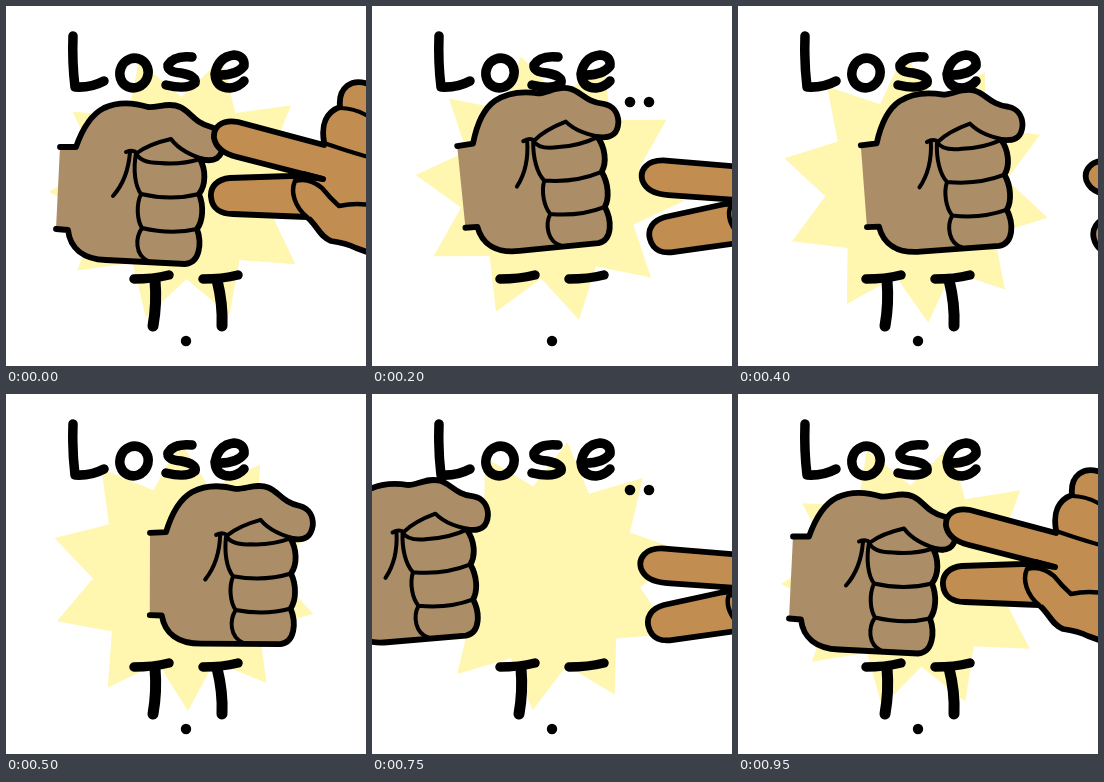
Write an HTML page that moves like this. It is 360 px wide and 360 px high and loops after 1 s.

```html
<!DOCTYPE html>
<html lang="en">
<head>
<meta charset="utf-8">
<title>Lose</title>
<style>
  html, body { margin: 0; width: 100%; height: 100%; overflow: hidden; background: #fff; }
  svg { display: block; width: 100vw; height: 100vh; }
  path { stroke-linecap: round; stroke-linejoin: round; }
  .line { stroke: #000; stroke-width: 5.8; }
  .thin { fill: none; stroke: #000; stroke-width: 4; }
  .ink { fill: none; stroke: #000; stroke-width: 9.5; }
  #fist { fill: #ab8d67; }
  #hand { fill: #c18d51; }
</style>
</head>
<body>
<svg viewBox="0 0 360 360" role="img" aria-label="Lose... T.T">
  <polygon id="star" fill="#fff6af"/>

  <g id="fist">
    <path class="line" d="M54 141 L70 141 C76 124 84 109 98 102 C111 96 126 96 142 101
      C151 102 163 96 174 101 C184 105 188 117 205 121 C214 124 218 132 217 141
      C215 151 210 157 194 153 C200 164 200 179 193 188 C198 200 197 215 191 223
      C196 237 194 257 179 258 L100 254 C77 253 64 242 62 224 L50 223"/>
    <path class="thin" d="M120 146 Q127 143 131 147 Q143 138 165 133 Q176 148 204 155
      M124 146 Q122 173 107 190
      M130 147 Q134 157 154 157 Q175 159 194 153
      M130 147 C127 164 129 180 135 188 Q165 195 193 188
      M135 188 C130 199 131 214 136 222 Q165 229 191 223
      M136 222 C129 232 129 249 142 255"/>
  </g>

  <g id="hand">
    <path class="line" d="M440 78 L362 78 C346 72 332 81 334 101 C320 106 315 119 318 136
      L318 139 L232 116 C216 113 207 121 208 132 C210 143 219 148 231 151 L317 173
      Q300 169 284 170 L224 172 C211 173 204 181 205 191 C206 203 215 208 227 208
      L301 211 C311 219 314 231 325 235 Q340 237 350 242 L440 275"/>
    <path class="thin" d="M334 102 Q348 102 362 110 M318 137 Q338 144 362 151"/>
    <path class="line" style="stroke-width:4.5" d="M301 211 C289 201 284 186 289 175
      Q303 171 316 182 Q324 192 333 200 Q352 196 368 200"/>
    <path class="line" fill="none" d="M284 170 Q303 170 317 173 L298 168"/>
  </g>

  <g class="ink">
    <path d="M67 30 Q66 56 69 81 Q85 82 98 75"/>
    <ellipse cx="128" cy="67" rx="14" ry="15" transform="rotate(25 128 67)"/>
    <path d="M186 51 Q168 49 162 59 Q161 66 175 67 Q191 70 189 77 Q181 84 160 79"/>
    <path d="M211 69 Q230 70 238 60 Q239 50 228 49 Q212 51 209 68 Q210 82 224 82 Q233 81 238 75"/>
    <path d="M128 273 Q147 273 163 269 M197 273 Q216 273 232 269"/>
    <path id="stem1" stroke-width="11" d="M149 274 Q151 298 147 320"/>
    <path id="stem2" stroke-width="11" d="M211 274 Q217 298 216 320"/>
  </g>
  <circle cx="180" cy="335" r="5.200"/>
  <g id="dots">
    <circle cx="258" cy="96" r="5.300"/>
    <circle cx="277" cy="96" r="5.300"/>
    <circle cx="296" cy="96" r="5.300"/>
  </g>
</svg>
<script>
  const LOOP = 1000, STEP = 50;
  const LEAVE = 550, HIT = 950;  // last step moving away, moment of contact
  const TIPS = 10;

  const el = id => document.getElementById(id);
  const dots = [...el('dots').children];
  const clamp = v => Math.max(0, Math.min(1, v));
  const show = (node, on) => node.setAttribute('visibility', on ? 'visible' : 'hidden');

  function place(id, x, y, angle, px, py) {
    el(id).setAttribute('transform', `translate(${x} ${y}) rotate(${angle}) translate(${-px} ${-py})`);
  }

  // Turns by one tip per loop, so the end meets the start.
  function drawStar(t) {
    const points = [];
    for (let i = 0; i < 2 * TIPS; i++) {
      const a = (2 * t / LOOP + i) * Math.PI / TIPS + 0.6;
      const r = i % 2 ? 91 : 135;
      points.push(`${178 + r * Math.cos(a)},${182 + r * Math.sin(a)}`);
    }
    el('star').setAttribute('points', points.join(' '));
  }

  function drawHands(t) {
    const away = t <= LEAVE;
    const left = Math.max(0, HIT - t) / 100;
    const lift = clamp(Math.min(t / 100, left));  // 0 in contact, 1 apart

    const fistX = away ? 53 + 0.14 * t + 0.00008 * t * t : 54 - 40 * left ** 1.33;
    const fistTilt = away
      ? -9.4 * Math.sin(Math.PI * t / LEAVE)
      : -lift * (5 + 4.4 * (t - 600) / 250);
    place('fist', fistX, away ? 141 - t / 250 : 142.5, fistTilt, 53, 141);

    const handX = away ? 208 + 0.27 * t + 0.0002 * t * t : 208 + 20 * left ** 1.6;
    place('hand', handX, 130 + 42.5 * lift, -10.3 * lift, 208, 130);
  }

  // The lettering writes itself twice per loop.
  function drawText(t) {
    const phase = t % (LOOP / 2);
    const count = Math.floor(phase / 100) % 4;
    dots.forEach((dot, i) => show(dot, i < count));
    show(el('stem1'), phase < 100 || phase >= 250);
    show(el('stem2'), phase < 100 || phase >= 350);
  }

  function draw(ms) {
    const t = Math.floor((ms % LOOP) / STEP) * STEP;
    drawStar(t);
    drawHands(t);
    drawText(t);
  }

  const start = performance.now();
  function tick() {
    draw(performance.now() - start);
    requestAnimationFrame(tick);
  }
  tick();
</script>
</body>
</html>
```
